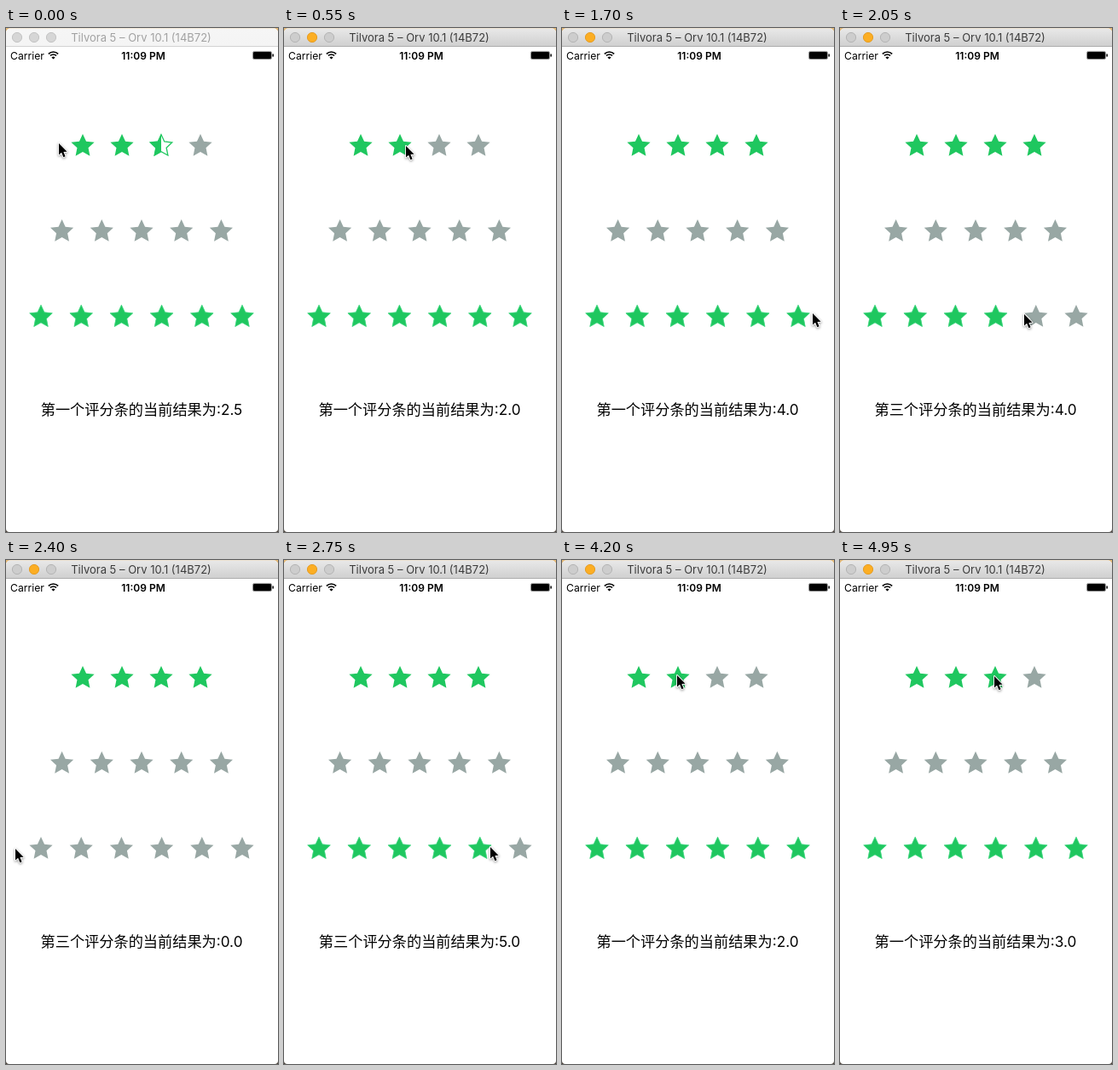
Write an HTML page with a canvas that moves like this. It is 319 px wide and 590 px high and loops after 5000 ms.

```html
<!DOCTYPE html>
<html lang="zh">
<head>
<meta charset="utf-8">
<title>Star rating</title>
<style>
  html, body { margin: 0; width: 100%; height: 100%; overflow: hidden; background: #fff; }
  canvas, svg { position: absolute; left: 0; top: 0; width: 319px; height: 590px; }
  text { font-family: Inter, "Noto Sans CJK SC", "Noto Sans CJK", sans-serif; text-anchor: middle; }
</style>
</head>
<body>
<canvas id="stage" width="319" height="590"></canvas>
<svg viewBox="0 0 319 590">
  <text id="title" x="158.5" y="16" font-size="13">Tilvora 5 – Orv 10.1 (14B72)</text>
  <text x="5" y="36.5" font-size="12.2" style="text-anchor:start">Carrier</text>
  <text x="161" y="36.5" font-size="12" font-weight="600">11:09 PM</text>
  <text id="label" x="159" y="453" font-size="17.2"></text>
</svg>
<script>
const W = 319, H = 590, MID = 159, LOOP = 5000, STEP = 50;
const GREEN = '#1fc75f', GREY = '#98a7a4';
const ctx = document.getElementById('stage').getContext('2d');
const title = document.getElementById('title');
const label = document.getElementById('label');

// Rows are centred and 100 px apart
const rows = [
  { name: '一', count: 4, gap: 46, start: 2.5, half: true },
  { name: '二', count: 5, gap: 46.7, start: 0 },
  { name: '三', count: 6, gap: 47.2, start: 6, edge: '#45d985' }
].map((row, n) => ({ ...row, x: MID - (row.count - 1) / 2 * row.gap, y: 138.2 + n * 100 }));

// Eased pointer moves; a move with a row drags that row's rating
const home = { x: 62, y: 135 };
const moves = [
  { from: 300, to: 850, x: 249, y: 143, row: 0 },
  { from: 850, to: 1250, x: 27, y: 348 },
  { from: 1380, to: 1700, x: 294, y: 334 },
  { from: 1850, to: 2430, x: 9, y: 338, row: 2 },
  { from: 2470, to: 2850, x: 290, y: 335, row: 2 },
  { from: 2950, to: 3250, x: 188, y: 142 },
  { from: 3400, to: 3700, x: 165, y: 138, row: 0 },
  { from: 3850, to: 4350, x: 127, y: 134, row: 0 },
  { from: 4450, to: 4700, x: 82, y: 138, row: 0 },
  { from: 4700, to: 4950, x: 181, y: 136, row: 0 }
];

const ease = k => k * k * (3 - 2 * k);
const mix = (a, b, k) => Math.round(a + (b - a) * k);

function scoreAt(row, x) {
  let score = 0;
  for (let i = 0; i < row.count; i++) {
    const d = x - row.x - i * row.gap;
    if (d >= (row.half ? -10 : 0)) score = i + 1;
    else if (row.half && d >= -20) score = i + 0.5;
  }
  return score;
}

function stateAt(t) {
  const scores = rows.map(row => row.start);
  let pos = home, last = 0;
  for (const m of moves) {
    if (t <= m.from) break;
    const k = ease(Math.min(1, (t - m.from) / (m.to - m.from)));
    pos = { x: mix(pos.x, m.x, k), y: mix(pos.y, m.y, k) };
    if (m.row !== undefined) {
      last = m.row;
      scores[last] = scoreAt(rows[last], pos.x);
    }
  }
  return { scores, pos, last };
}

function circle(x, y, r, fill, line) {
  ctx.beginPath();
  ctx.arc(x, y, r, 0, Math.PI * 2);
  ctx.fillStyle = fill;
  ctx.fill();
  ctx.strokeStyle = line;
  ctx.lineWidth = 1;
  ctx.stroke();
}

function box(x, y, w, h, r) {
  ctx.beginPath();
  ctx.roundRect(x, y, w, h, r);
}

function starPath(x, y, R) {
  ctx.beginPath();
  for (let i = 0; i < 10; i++) {
    const a = i * Math.PI / 5, r = i % 2 ? R * 0.48 : R;
    ctx.lineTo(x + r * Math.sin(a), y - r * Math.cos(a));
  }
  ctx.closePath();
}

function star(x, y, fill, edge) {
  ctx.save();
  if (fill === 0.5) {
    starPath(x, y, 13.4);
    ctx.strokeStyle = GREEN;
    ctx.lineWidth = 1.3;
    ctx.stroke();
    ctx.beginPath();
    ctx.rect(x - 15, y - 15, 15, 30);
    ctx.clip();
  }
  starPath(x, y, 14.3);
  ctx.fillStyle = fill ? GREEN : GREY;
  ctx.fill();
  if (fill && edge) {
    starPath(x, y, 13.9);
    ctx.strokeStyle = edge;
    ctx.lineWidth = 0.8;
    ctx.stroke();
  }
  ctx.restore();
}

function drawWindow(active) {
  ctx.fillStyle = '#e3b877';
  ctx.fillRect(0, 0, W, 20);
  ctx.fillStyle = '#4a4038';
  ctx.fillRect(0, H - 20, W, 20);
  ctx.save();
  box(0, 0.6, W, H - 0.6, [5, 5, 4, 4]);
  ctx.clip();
  ctx.fillStyle = '#fff';
  ctx.fillRect(0, 0, W, H);
  const bar = ctx.createLinearGradient(0, 0, 0, 21);
  bar.addColorStop(0, active ? '#e9e9e9' : '#f6f6f6');
  bar.addColorStop(1, active ? '#d0d0d0' : '#f4f4f4');
  ctx.fillStyle = bar;
  ctx.fillRect(0, 0, W, 21);
  ctx.fillStyle = active ? '#adadad' : '#d2d2d2';
  ctx.fillRect(0, 21, W, 1);
  ctx.restore();
  for (let i = 0; i < 3; i++) {
    const lit = active && i === 1;
    circle(13 + i * 20, 11, 5.6, lit ? '#fcae23' : active ? '#cdcdcd' : '#d6d6d6',
      lit ? '#e59c22' : active ? '#b4b4b4' : '#c3c3c3');
  }
}

function drawStatus() {
  ctx.strokeStyle = ctx.fillStyle = '#000';
  ctx.lineWidth = 1.7;
  for (const r of [8, 5]) {
    ctx.beginPath();
    ctx.arc(55.5, 36, r, -Math.PI * 0.75, -Math.PI * 0.25);
    ctx.stroke();
  }
  ctx.beginPath();
  ctx.moveTo(55.5, 36.6);
  ctx.arc(55.5, 36.6, 3, -Math.PI * 0.75, -Math.PI * 0.25);
  ctx.fill();
  box(290, 28, 21, 8, 1);
  ctx.fill();
  box(312.4, 30.3, 1.5, 3.4, 0.8);
  ctx.fill();
  box(289.4, 27.4, 22.2, 9.2, 2);
  ctx.strokeStyle = '#444';
  ctx.lineWidth = 0.6;
  ctx.stroke();
}

function drawPointer({ x, y }) {
  ctx.save();
  ctx.translate(x, y);
  ctx.beginPath();
  ctx.moveTo(0, 0);
  ctx.lineTo(0, 13.6);
  ctx.lineTo(3.1, 10.8);
  ctx.lineTo(5.4, 16.2);
  ctx.lineTo(7.6, 15.2);
  ctx.lineTo(5.4, 10);
  ctx.lineTo(9.6, 9.8);
  ctx.closePath();
  ctx.lineJoin = 'round';
  ctx.lineWidth = 1.8;
  ctx.strokeStyle = '#fff';
  ctx.shadowColor = 'rgba(0,0,0,.45)';
  ctx.shadowBlur = 3;
  ctx.shadowOffsetY = 1;
  ctx.stroke();
  ctx.shadowColor = 'transparent';
  ctx.fillStyle = '#000';
  ctx.fill();
  ctx.restore();
}

function draw(t) {
  const active = t >= 350;
  const { scores, pos, last } = stateAt(t);
  drawWindow(active);
  drawStatus();
  rows.forEach((row, n) => {
    for (let i = 0; i < row.count; i++) {
      const fill = Math.max(0, Math.min(1, scores[n] - i));
      star(row.x + i * row.gap, row.y, fill, row.edge);
    }
  });
  drawPointer(pos);
  title.setAttribute('fill', active ? '#3c3c3c' : '#a2a2a2');
  label.textContent = `第${rows[last].name}个评分条的当前结果为:${scores[last].toFixed(1)}`;
}

const begin = performance.now();
function tick() {
  const t = (performance.now() - begin) % LOOP;
  draw(Math.floor(t / STEP) * STEP);
  requestAnimationFrame(tick);
}
tick();
</script>
</body>
</html>
```
